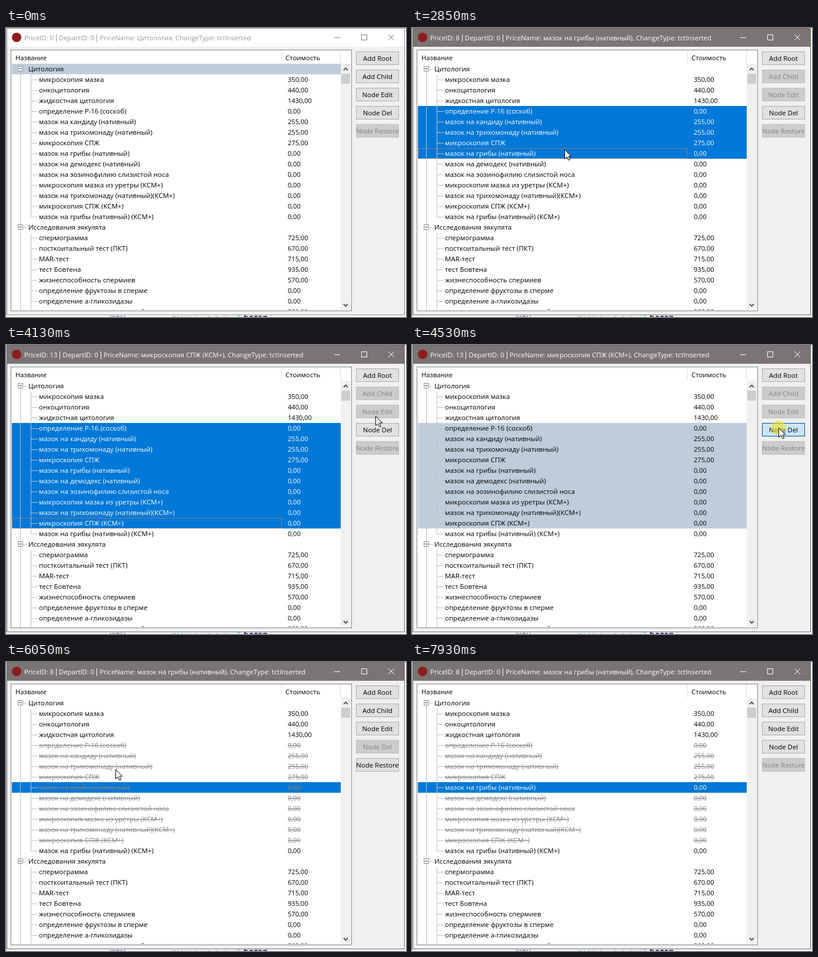
Recreate the animation shown at these times as an HTML page with a canvas. Size 680x493 px, loop 8000 ms.

```html
<!DOCTYPE html>
<html lang="ru">
<head>
<meta charset="utf-8">
<style>
html, body { margin: 0; width: 100%; height: 100%; overflow: hidden; background: #fff; }
canvas { display: block; width: 680px; height: 493px; }
</style>
</head>
<body>
<canvas id="stage" width="680" height="493"></canvas>
<script>
const ctx = document.getElementById('stage').getContext('2d', { alpha: false });
const LOOP = 8000, ROW = 18, TOP = 61, BOTTOM = 481;
const FAMILY = '"Open Sans", "Noto Sans", sans-serif';
const BLUE = '#0078d7', PALE = '#bfcddb', GRAY = '#808080';

// Name and price; a row without a price is a root.
const rows = `Цитология
микроскопия мазка|350
онкоцитология|440
жидкостная цитология|1430
определение Р-16 (соскоб)|0
мазок на кандиду (нативный)|255
мазок на трихомонаду (нативный)|255
микроскопия СПЖ|275
мазок на грибы (нативный)|0
мазок на демодекс (нативный)|0
мазок на эозинофилию слизистой носа|0
микроскопия мазка из уретры (КСМ+)|0
мазок на трихомонаду (нативный)(КСМ+)|0
микроскопия СПЖ (КСМ+)|0
мазок на грибы (нативный) (КСМ+)|0
Исследования эякулята
спермограмма|725
посткоитальный тест (ПКТ)|670
MAR-тест|715
тест Бовтена|935
жизнеспособность спермиев|570
определение фруктозы в сперме|0
определение а-гликозидазы|0
исследование спермы тестовый|360`.split('\n').map(line => line.split('|'));
const FIRST = 4, MIDDLE = 8, LAST = 13;

const labels = ['Add Root', 'Add Child', 'Node Edit', 'Node Del', 'Node Restore'];
const looks = {
  normal: ['#e1e1e1', '#adadad', '#000'],
  disabled: ['#cccccc', '#bfbfbf', '#838383'],
  hot: ['#e5f1fb', BLUE, '#000'],
  pressed: ['#cce4f7', '#005499', '#000']
};

// Each entry changes part of the window from its time on.
const story = [
  [0, { active: false, title: 0, from: 0, to: 0, fill: PALE, deleted: [] }],
  [340, { active: true, title: FIRST, from: FIRST, to: FIRST, fill: BLUE }],
  [2810, { title: MIDDLE, to: MIDDLE }],
  [3450, { title: LAST }],
  [3530, { to: LAST }],
  [4490, { fill: PALE }],
  [4650, { deleted: rows.map((_, i) => i).slice(FIRST, LAST + 1) }],
  [5490, { fill: BLUE }],
  [5570, { title: MIDDLE, from: MIDDLE, to: MIDDLE }],
  [7250, { fill: PALE }],
  [7330, { deleted: rows.map((_, i) => i).slice(FIRST, LAST + 1).filter(i => i !== MIDDLE) }],
  [7450, { fill: BLUE }]
];

// Places where the pointer rests; a click comes just before it leaves.
const CLICK = 160;
const stops = [
  { at: 340, until: 580, x: 250, y: 141, click: true },
  { at: 970, until: 970, x: 645, y: 78 },
  { at: 1490, until: 2050, x: 266, y: 206 },
  { at: 2610, until: 2850, x: 259, y: 207, click: true },
  { at: 3250, until: 3250, x: 272, y: 307 },
  { at: 3410, until: 3490, x: 275, y: 294 },
  { at: 3930, until: 3930, x: 640, y: 79 },
  { at: 4250, until: 4690, x: 623, y: 141, click: true },
  { at: 5250, until: 5650, x: 228, y: 212, click: true },
  { at: 6130, until: 6130, x: 183, y: 181 },
  { at: 6530, until: 6530, x: 560, y: 83 },
  { at: 6850, until: 7370, x: 621, y: 175, click: true },
  { at: 7810, until: 7850, x: 468, y: 160 }
];

function pointerAt(t) {
  const i = stops.findIndex(stop => t < stop.until);
  if (i < 0 || t < stops[0].at) return null;
  const next = stops[i];
  if (t >= next.at) return { ...next, click: next.click && t >= next.until - CLICK };
  const last = stops[i - 1], u = (t - last.until) / (next.at - last.until), k = u * u * (3 - 2 * u);
  const mix = key => Math.round(last[key] + (next[key] - last[key]) * k);
  return { x: mix('x'), y: mix('y') };
}

function rect(x, y, w, h, color) {
  ctx.fillStyle = color;
  ctx.fillRect(x, y, w, h);
}

function frame(x, y, w, h, fill, border) {
  rect(x, y, w, h, border);
  rect(x + 1, y + 1, w - 2, h - 2, fill);
}

function text(string, x, y, color, size, align = 'left', weight = 400) {
  ctx.font = `${weight} ${size}px ${FAMILY}`;
  ctx.textAlign = align;
  ctx.fillStyle = color;
  ctx.fillText(string, x, y);
}

function stroke(color, width, ...points) {
  ctx.strokeStyle = color;
  ctx.lineWidth = width;
  ctx.beginPath();
  points.forEach(([x, y]) => ctx.lineTo(x, y));
  ctx.stroke();
}

function circle(x, y, r, color) {
  ctx.fillStyle = color;
  ctx.beginPath();
  ctx.arc(x, y, r, 0, 2 * Math.PI);
  ctx.fill();
}

function clipped(x, y, w, h, paint) {
  ctx.save();
  ctx.beginPath();
  ctx.rect(x, y, w, h);
  ctx.clip();
  paint();
  ctx.restore();
}

// One-pixel line with a dot wherever x + y is even
function dots(x, y, w, h, color) {
  for (let i = x; i < x + w; i++)
    for (let j = y; j < y + h; j++)
      if ((i + j) % 2 === 0) rect(i, j, 1, 1, color);
}

function treeLine(x, y, w, h) {
  rect(x, y, w, h, '#fff');
  dots(x, y, w, h, GRAY);
}

function drawBackdrop() {
  rect(0, 0, 680, 493, '#fff');
  rect(0, 0, 1, 493, '#d5d8dd');
  text('жен', 176, 499, '#3c3c80', 14);
  text('перечень значений', 282, 499, '#3a9a8a', 12);
  text('богар', 404, 499, '#202060', 14, 'left', 700);
}

function drawTitle(s) {
  const ink = s.active ? '#fff' : '#999', sign = s.active ? '#fff' : '#808080';
  frame(1, 0, 677, 490, '#f0f0f0', s.active ? '#6b6664' : '#8c8c8c');
  rect(2, 1, 675, 31, s.active ? '#7a7574' : '#fff');
  circle(18, 16, 8, '#8f1c1c');

  let x = 31;
  const parts = [`PriceID: ${s.title} `, ' DepartID: 0 ',
    ` PriceName: ${rows[s.title][0]}, ChangeType: tctInserted`];
  parts.forEach((part, i) => {
    if (i) rect(Math.round(x) + 1, 11, 1, 13, ink);
    if (i) x += 3;
    text(part, x, 21, ink, 11.35);
    x += ctx.measureText(part).width;
  });

  rect(558, 16, 10, 1, sign);
  ctx.strokeStyle = sign;
  ctx.lineWidth = 1;
  ctx.strokeRect(604.5, 11.5, 9, 9);
  stroke(sign, 1, [650, 11], [660, 21]);
  stroke(sign, 1, [660, 11], [650, 21]);
}

function drawRow(i, s) {
  const [name, price] = rows[i], y = TOP + i * ROW, isRoot = price === undefined;
  const selected = i >= s.from && i <= s.to, struck = s.deleted.includes(i);
  const ink = struck ? GRAY : selected && s.fill === BLUE ? '#fff' : '#000';
  const label = (string, x, size) => {
    text(string, x, y + 13, ink, size);
    if (struck) rect(x, y + 9, ctx.measureText(string).width, 1, ink);
  };
  if (selected) rect(10, y, 559, ROW, s.fill);
  treeLine(24, i ? y : y + 9, 1, ROW);
  if (isRoot) {
    treeLine(30, y + 9, 6, 1);
    frame(20, y + 4, 9, 9, '#fff', '#919191');
    rect(22, y + 8, 5, 1, '#404040');
    label(name, 38, 11.5);
  } else {
    const isLastChild = rows[i + 1] && rows[i + 1].length === 1;
    treeLine(42, y, 1, isLastChild ? 10 : ROW);
    treeLine(42, y + 9, 12, 1);
    label(name, 56, 11.5);
    label(price + ',00', 479, 11.15);
  }
  if (i === s.to && s.to > s.from && s.fill === BLUE) {
    const dot = '#ff8728';
    dots(10, y, 459, 1, dot);
    dots(10, y + ROW - 1, 459, 1, dot);
    dots(10, y, 1, ROW, dot);
    dots(468, y, 1, ROW, dot);
  }
}

function drawList(s) {
  frame(8, 37, 580, 446, '#fff', '#828790');
  text('Название', 16, 55, '#000', 11.2);
  text('Стоимость', 475, 55, '#000', 11.4);
  rect(468, 38, 1, 23, '#dedede');
  rect(568, 38, 1, 23, '#dedede');
  clipped(9, TOP, 560, BOTTOM - TOP, () => rows.forEach((_, i) => drawRow(i, s)));

  rect(569, TOP, 17, BOTTOM - TOP, '#f0f0f0');
  rect(570, 78, 15, 17, '#cdcdcd');
  stroke('#505050', 1.8, [574, 72], [577.5, 68.5], [581, 72]);
  stroke('#505050', 1.8, [574, 471], [577.5, 474.5], [581, 471]);
}

function drawButtons(s, pointer) {
  const several = s.to > s.from, removed = s.deleted.includes(s.to);
  const enabled = [true, !several, !several, !removed, removed];
  labels.forEach((label, i) => {
    const y = 40 + 31 * i;
    if (label === 'Node Del' && several && removed) return;
    const over = pointer && pointer.x >= 595 && pointer.x < 668 && pointer.y >= y && pointer.y < y + 23;
    const look = !enabled[i] ? 'disabled' : !over ? 'normal' : s.fill === PALE ? 'pressed' : 'hot';
    const [fill, border, ink] = looks[look];
    frame(595, y, 73, 23, fill, border);
    clipped(596, y, 71, 23, () => text(label, 631.5, y + 16, ink, 11.4, 'center'));
  });
}

function drawPointer({ x, y, click }) {
  if (click) circle(x, y, 12, 'rgba(240,228,10,.57)');
  ctx.save();
  ctx.translate(x + .5, y + .5);
  ctx.beginPath();
  for (const p of [[0, 0], [0, 16], [4, 12.5], [6.5, 18], [9, 17], [6.5, 11.5], [11.3, 11.3]]) ctx.lineTo(...p);
  ctx.closePath();
  ctx.fillStyle = '#fff';
  ctx.fill();
  ctx.strokeStyle = '#000';
  ctx.lineWidth = 1;
  ctx.stroke();
  ctx.restore();
}

function draw() {
  const now = performance.now() % LOOP;
  const t = Math.max(0, Math.floor((now - 10) / 40) * 40 + 10);
  const state = Object.assign({}, ...story.filter(([time]) => time <= t).map(([, change]) => change));
  const pointer = pointerAt(t);
  drawBackdrop();
  drawTitle(state);
  drawList(state);
  drawButtons(state, pointer);
  if (pointer) drawPointer(pointer);
  requestAnimationFrame(draw);
}
draw();
</script>
</body>
</html>
```
